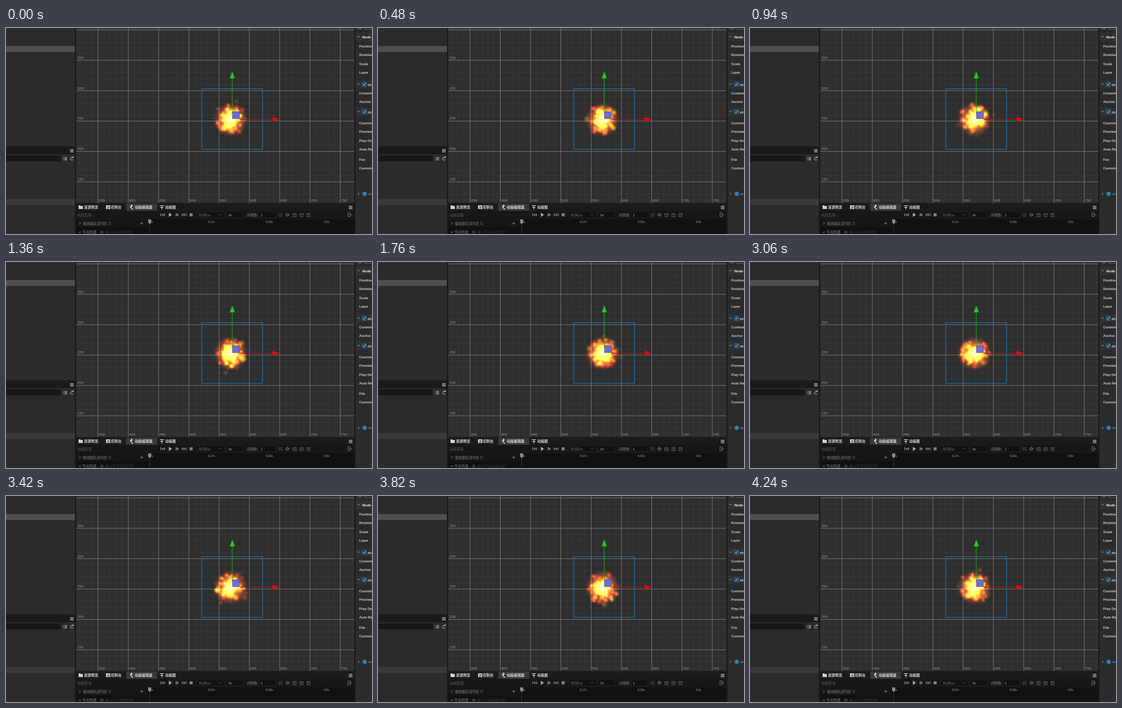
These frames come from a looping animation (600 px wide and 338 px high, 4.27 s). An HTML page with a canvas:

```html
<!DOCTYPE html>
<html lang="zh">
<head>
<meta charset="utf-8">
<style>
html, body { margin: 0; width: 100%; height: 100%; overflow: hidden; background: #1a1a1a; }
canvas { display: block; }
</style>
</head>
<body>
<canvas id="stage" width="600" height="338"></canvas>
<script>
const LOOP = 4270, CX = 368, CY = 150;
const stage = document.getElementById('stage').getContext('2d');
const ui = document.createElement('canvas');
ui.width = 600; ui.height = 338;
let g = ui.getContext('2d');

function box(x, y, w, h, color) { g.fillStyle = color; g.fillRect(x, y, w, h); }

function frame(x, y, w, h, color) {
  g.strokeStyle = color; g.lineWidth = 1;
  g.strokeRect(x + .5, y + .5, w - 1, h - 1);
}

function text(s, x, y, color, size = 5.8, weight = 400, family = 'Liberation Sans') {
  g.font = `${weight} ${size}px "${family}", "Noto Sans CJK SC", "Noto Sans CJK", sans-serif`;
  g.fillStyle = color;
  g.fillText(s, x, y);
}

function arc(x, y, r, color, from = 0, to = 7) {
  g.strokeStyle = color; g.lineWidth = 1;
  g.beginPath(); g.arc(x, y, r, from, to); g.stroke();
}

// Triangle centred on x, y; dir turns it in quarter steps from pointing right.
function triangle(x, y, w, h, dir, color) {
  g.save();
  g.translate(x, y); g.rotate(dir * Math.PI / 2);
  g.fillStyle = color;
  g.beginPath(); g.moveTo(w / 2, 0); g.lineTo(-w / 2, -h / 2); g.lineTo(-w / 2, h / 2); g.fill();
  g.restore();
}

function chevron(x, y, dir, color = '#999') {
  g.save();
  g.translate(x, y); g.rotate(dir * Math.PI / 2);
  g.strokeStyle = color; g.lineWidth = .9;
  g.beginPath(); g.moveTo(-1, -2); g.lineTo(1, 0); g.lineTo(-1, 2); g.stroke();
  g.restore();
}

function menu(x, y) {
  for (let i = 0; i < 3; i++) box(x, y + i * 2, 6, 1, '#c4c4c4');
}

function drawScene() {
  box(115, 0, 457, 287, '#2e2e2e');
  const dx = 49.65, dy = 49.85, left = 150.3, top = 2.6;
  for (const major of [false, true]) {
    const color = major ? '#707070' : '#383838', n = major ? 1 : 5;
    for (let x = left - dx; x < 572; x += dx / n) if (x > 115) box(x, 0, 1, 287, color);
    for (let y = top; y < 287; y += dy / n) box(115, y, 457, 1, color);
  }
  for (let i = 0; i < 5; i++) text(350 - i * 50, 117, 51 + i * 49.7, '#929292', 6.1);
  for (let i = 0; i < 9; i++) text(350 + i * 50, 152 + i * dx, 285, '#929292', 6.1);
  frame(320.7, 99.1, 100.5, 100.5, '#2576ae');
}

function drawLeft() {
  box(0, 0, 115, 338, '#2b2b2b');
  box(0, 29.5, 113, 10, '#4f4f4f');
  box(0, 194, 113, 13, '#1a1a1a');
  menu(105, 199);
  box(0, 209, 90, 10, '#181818');
  for (let y = 212; y < 218; y += 2) { box(94, y, 1, 1, '#bbb'); box(96, y, 4, 1, '#bbb'); }
  arc(108, 214.5, 2.3, '#bbb', .5, 5.6);
  box(109, 211, 2, 2, '#bbb');
  box(0, 280.5, 113, 10, '#3a3a3a');
  box(113, 0, 2, 338, '#191919');
}

function section(y, name, checked) {
  box(573, y - 6, 27, 13, '#313131');
  chevron(578, y, 1);
  text(name, checked ? 593 : 584, y + 2.5, '#dedede', 6.2, 700, 'Roboto');
  if (!checked) return;
  box(584, y - 3, 7, 7, '#17354a');
  frame(584, y - 3, 7, 7, '#2d7db1');
  g.strokeStyle = '#e4e4e4';
  g.beginPath(); g.moveTo(585.5, y + .5); g.lineTo(587, y + 2); g.lineTo(589.5, y - 1.5); g.stroke();
}

function fields(y, ...names) {
  names.forEach((s, i) => text(s, 579, y + i * 14.3, '#d6d6d6', 6.1, 500, 'Roboto'));
}

function drawRight() {
  box(571, 0, 2, 338, '#191919');
  box(573, 0, 27, 338, '#2b2b2b');
  arc(580, -1, 3, '#777');
  frame(588, -5, 15, 8, '#555');
  section(14, 'Node');
  fields(32, 'Position', 'Rotation', 'Scale', 'Layer');
  section(92, 'cc.', true);
  fields(109, 'Content', 'Anchor Point');
  section(137, 'cc.', true);
  fields(158, 'CustomFile', 'Preview', 'Play On Load', 'Auto Remove');
  fields(218, 'File', 'Custom');
  chevron(578, 272, 0);
  g.fillStyle = '#2583bf';
  g.beginPath(); g.arc(588, 272, 3.5, 0, 7); g.fill();
  text('ui-', 594, 274, '#aaa');
}

function drawTabs() {
  const c = '#d4d4d4';
  box(115, 287, 457, 13, '#1b1b1b');
  box(197, 288, 51, 12, '#383838');
  const tab = (s, x) => text(s, x, 296, '#dcdcdc', 5.8, 700);
  tab('资源预览', 128); tab('控制台', 172); tab('动画编辑器', 211); tab('动画图', 261);
  box(119, 291, 3, 2, c); box(119, 292, 7, 5, c);
  box(164, 291, 7, 6, c); box(166, 293, 4, 1, '#222'); box(166, 295, 3, 1, '#222');
  box(205, 290, 2, 2, c); box(203, 292, 5, 1, c); box(204, 293, 2, 3, c); box(206, 296, 2, 2, c);
  box(252, 291, 7, 1, c); box(253, 294, 5, 1, c); box(255, 291, 1, 7, c);
  menu(562, 292);
}

function input(x, w, s) {
  box(x, 301, w, 11, '#111');
  frame(x, 301, w, 11, '#222');
  text(s, x + 3.5, 308.7, '#b0b0b0', 6);
}

function drawToolbar() {
  const y = 306.5, c = '#808080', dim = '#666';
  box(115, 300, 457, 14, '#171717');
  text('动画剪辑', 117, 308.5, '#5c5c5c');
  for (const dir of [2, 0]) {
    const side = 1 - dir, x = 274.5 - side * -1 * 0;
    const at = d => x + side * d;
    triangle(at(15.5), y, 3, 5, dir, c); triangle(at(18.5), y, 3, 5, dir, c);
    box(at(21) - .5, 304, 1, 5, c);
    triangle(at(7), y, 4, 6, dir, c);
    box(at(4) - .5, 304, 1, 5, c);
  }
  box(264, 301, 10, 11, '#171717');
  triangle(269.5, y, 5, 7, 0, '#aaa');
  box(301, 304, 5, 5, c);
  input(312, 46, '');
  text('时间(s)', 316, 309, '#757575', 6.2);
  chevron(351, y, 1, dim);
  input(361, 28, '0c');
  text('间隔数:', 395, 309, '#808080', 5.6);
  input(414, 29, '1');
  for (let i = 0; i < 9; i++) box(447 + i % 3 * 2.4, 304 + Math.floor(i / 3) * 2.2, 1.2, 1.2, dim);
  triangle(463, y, 3.5, 7, 0, dim); triangle(459.5, y, 3.5, 7, 2, dim);
  box(460, 305.5, 2, 2, '#171717');
  for (let x = 470; x < 500; x += 11.5) { frame(x, 304, 6, 6, '#5c5c5c'); box(x + 2, 306, 2, 1, c); }
  frame(560, 303, 5, 7, dim);
  box(562, 306, 5, 1, dim);
}

function drawTimeline() {
  box(115, 314, 457, 24, '#111');
  box(115, 314, 117, 13, '#161616');
  chevron(121, 320.5, 0);
  text('播放器轨道列表', 126, 323, '#7c7c7c', 5.7);
  frame(168, 318, 4, 5, '#444');
  box(220, 320, 5, 1, '#777'); box(222, 318, 1, 5, '#777');
  chevron(121, 335, 1);
  text('节点列表', 125, 337, '#8c8c8c');
  arc(157, 335, 2, '#666');
  text('输入节点名称过滤', 163, 337, '#383838', 5.7);
  ['0s', '0.17s', '0.33s', '0.5s'].forEach((s, i) => text(s, 236 + i * 95, 319.5, '#808080', 4.6, 700));
  box(235, 315, 1, 23, '#333');
  box(233, 314, 5, 5, '#8c8c8c');
  triangle(235.5, 320.5, 3, 5, 1, '#8c8c8c');
}

function rnd(a, b, c) {
  const v = Math.sin(a * 127.1 + b * 311.7 + c * 74.7) * 43758.5453;
  return v - Math.floor(v);
}

function glow(x, y, r, hue, alpha) {
  const grad = g.createRadialGradient(x, y, 0, x, y, r);
  grad.addColorStop(0, `hsla(${hue},100%,62%,${alpha})`);
  grad.addColorStop(.4, `hsla(${hue},98%,50%,${alpha * .6})`);
  grad.addColorStop(1, `hsla(${hue},95%,35%,0)`);
  g.fillStyle = grad;
  g.fillRect(x - r, y - r, r * 2, r * 2);
}

// Each particle flies out, fades and starts again with a new seeded heading.
function drawParticles(t) {
  for (let i = 0; i < 125; i++) {
    const cycles = 6 + i % 5;
    const clock = t / LOOP * cycles + rnd(i, 0, 9);
    const cycle = Math.floor(clock) % cycles, p = clock % 1;
    const r = k => rnd(i, cycle, k);
    const reach = 8 + 22 * r(1) + 9 * r(7) ** 8;
    const dist = reach * p ** .65, angle = r(2) * Math.PI * 2;
    const fade = Math.min(1, p * 8, (1 - p) * 4);
    const hue = r(3) < .03 ? 80 : 4 + 40 * r(4) ** 1.4;
    glow(CX + dist * Math.cos(angle), CY + dist * Math.sin(angle),
      3.2 + 3.6 * r(5), hue, fade * (.4 + .5 * r(6)));
  }
}

function drawFire(t) {
  g.save();
  g.beginPath(); g.rect(115, 0, 456, 287); g.clip();
  g.globalCompositeOperation = 'lighter';
  const core = g.createRadialGradient(CX, CY, 0, CX, CY, 29);
  core.addColorStop(0, 'rgba(255,235,130,1)');
  core.addColorStop(.25, 'rgba(255,190,65,.9)');
  core.addColorStop(.5, 'rgba(245,105,18,.6)');
  core.addColorStop(.75, 'rgba(215,50,8,.33)');
  core.addColorStop(1, 'rgba(140,20,0,0)');
  g.fillStyle = core;
  g.fillRect(CX - 29, CY - 29, 58, 58);
  drawParticles(t);
  g.restore();
}

function drawGizmo() {
  box(370.5, 82, 1, 59, '#1fae1f');
  triangle(371, 77, 11, 8.5, 3, '#22ca22');
  box(383, 149, 55, 1, '#a81818');
  triangle(442.5, 149.5, 11, 8.5, 0, '#ee0505');
  box(371, 137, 12, 12, 'rgba(108,100,212,.94)');
  frame(371, 137, 12, 12, '#5c58c8');
}

[drawScene, drawLeft, drawTabs, drawToolbar, drawTimeline, drawRight].forEach(part => part());
g = stage;

const start = performance.now();
function tick() {
  g.drawImage(ui, 0, 0);
  drawFire((performance.now() - start) % LOOP);
  drawGizmo();
  requestAnimationFrame(tick);
}
tick();
</script>
</body>
</html>
```
